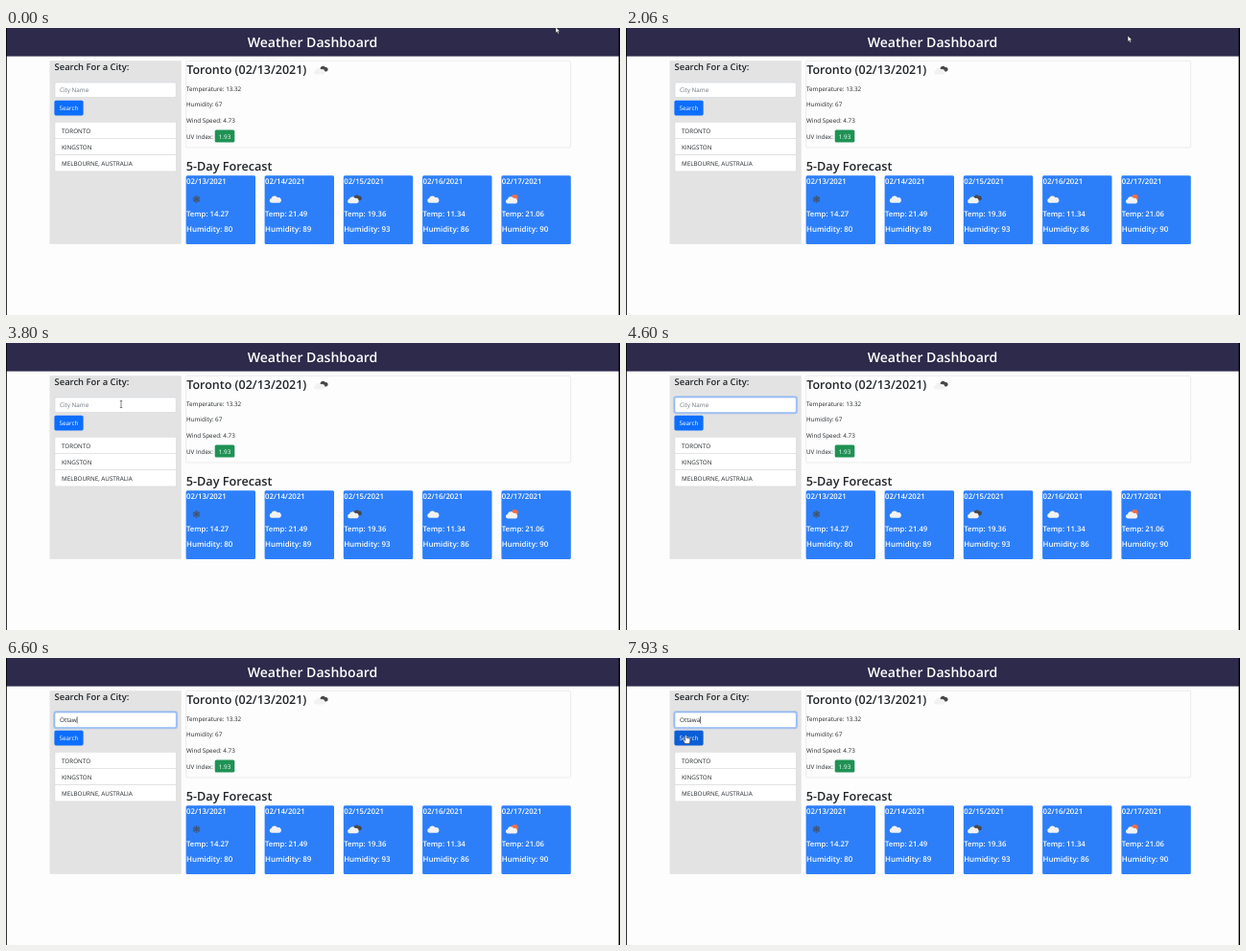
These frames come from a looping animation (640x300 px, 8 s). An HTML page:

```html
<!DOCTYPE html>
<html lang="en">
<head>
<meta charset="utf-8">
<title>Weather Dashboard</title>
<style>
  html, body { margin: 0; width: 100%; height: 100%; overflow: hidden; background: #fdfdfd; }
  svg { display: block; width: 640px; height: 300px; }
  text { font: 6.3px "Open Sans", "Noto Sans", sans-serif; fill: #212529; text-rendering: geometricPrecision; white-space: pre; }
  .head { font-weight: 600; }
  .light { fill: #fff; }
</style>
</head>
<body>
<svg id="stage" viewBox="0 0 640 300"></svg>
<script>
const LOOP = 8000, STEP = 1000 / 15;
const stage = document.getElementById('stage');

const rect = (x, y, w, h, fill, more = '') =>
  `<rect x="${x}" y="${y}" width="${w}" height="${h}" fill="${fill}" ${more}/>`;
const text = (x, y, s, more = '') => `<text x="${x}" y="${y}" ${more}>${s}</text>`;
const head = (x, y, size, s, cls = '', more = '') =>
  text(x, y, s, `class="head ${cls}" style="font-size:${size}px" ${more}`);

const cloud = (x, y, fill, k = 1) =>
  `<path transform="translate(${x} ${y}) scale(${k})" fill="${fill}"
    d="M2.5 7.6A2.4 2.4 0 0 1 2.4 2.9A3.5 3.5 0 0 1 8.8 2A2.9 2.9 0 0 1 10.6 7.6Z"/>`;
const overcast = (x, y) =>
  cloud(x + 5.4, y, '#48484a', .78) + cloud(x, y + 1.9, '#f2f2f2', .95);

const icons = {
  snow: x => {
    const arm = a => `<path transform="rotate(${a})" d="M0 0V-4M-1.3-3.6L0-2.3L1.3-3.6M-1-1.9L0-1L1-1.9"/>`;
    return `<g transform="translate(${x + 10.5} 179)" fill="none" stroke="#48484a" stroke-width=".65" opacity=".85">
      ${[0, 60, 120, 180, 240, 300].map(arm).join('')}</g>`;
  },
  cloud: x => cloud(x + 4.2, 175.2, '#f2f2f2'),
  overcast: x => overcast(x + 3.4, 174.2),
  sunny: x => `<circle cx="${x + 13.6}" cy="177.4" r="3.3" fill="#ec6e4c"/>` +
    cloud(x + 3.6, 176, '#f2f2f2')
};

const days = [
  [188, 13, 'snow', 14.27, 80],
  [270, 14, 'cloud', 21.49, 89],
  [352.2, 15, 'overcast', 19.36, 93],
  [434.5, 16, 'cloud', 11.34, 86],
  [516.8, 17, 'sunny', 21.06, 90]
];
const dayCard = ([x, day, icon, temp, humidity]) =>
  rect(x - .4, 154.2, 72.4, 71.7, '#2d7ff9', 'rx="1.5"') +
  head(x, 162.9, 7.8, `02/${day}/2021`, 'light') + icons[icon](x) +
  head(x, 197, 7.7, `Temp: ${temp}`, 'light') +
  head(x, 213.3, 7.9, `Humidity: ${humidity}`, 'light');

const listRow = (name, i) =>
  rect(51, 98.3 + i * 17.2, 126.3, 17.2, '#fff', 'stroke="#d8d8d8" stroke-width=".5"') +
  text(58, 109.7 + i * 17.1, name);

stage.innerHTML =
  rect(0, 0, 640, 300, '#fdfdfd') +
  rect(0, 0, 640, 29.6, '#2d2a4b') +
  head(319.5, 19.6, 14.05, 'Weather Dashboard', 'light', 'text-anchor="middle"') +
  rect(45.5, 34.2, 137.2, 191.6, '#e3e3e3') +
  head(50.6, 44, 9.4, 'Search For a City:') +
  rect(51, 57, 126.3, 15.6, '#fff', 'id="field" rx="1.6" stroke-width=".6"') +
  rect(50.1, 56.1, 128.1, 17.4, 'none', 'id="ring" rx="2.2" stroke="#0d6efd" stroke-opacity=".28" stroke-width="1.7"') +
  text(56, 67.1, '', 'id="entry"') +
  rect(0, 61.2, .6, 7.2, '#111', 'id="caret"') +
  rect(50.4, 75.8, 30.2, 15.6, '', 'id="button" rx="1.6"') +
  text(65.5, 86, 'Search', 'class="light" text-anchor="middle"') +
  ['TORONTO', 'KINGSTON', 'MELBOURNE, AUSTRALIA'].map(listRow).join('') +
  rect(187.7, 34.3, 400.9, 90.7, '#fdfdfd', 'rx="1.5" stroke="#dfdfdf" stroke-width=".6"') +
  head(188.2, 48, 12.5, 'Toronto (02/13/2021)') +
  overcast(320.4, 39.5) +
  ['Temperature: 13.32', 'Humidity: 67', 'Wind Speed: 4.73', 'UV Index:']
    .map((s, i) => text(188, 65.8 + i * 16.6, s)).join('') +
  rect(217.7, 106.5, 20.6, 13, '#1f9254', 'rx="1.6"') +
  text(228, 115.5, '1.93', 'class="light" text-anchor="middle"') +
  head(187.8, 148.8, 12.65, '5-Day Forecast') +
  days.map(dayCard).join('') +
  rect(0, 0, .8, 300, '#000') + rect(638.6, 0, 1.4, 300, '#000') +
  `<path id="arrow" d="M0 0V6L1.4 4.8L2.4 7L3.4 6.5L2.5 4.4H4.3Z" fill="#fff" stroke="#222" stroke-width=".4"/>
   <path id="beam" d="M-1.2-3.5H1.2M0-3.5V3.5M-1.2 3.5H1.2" fill="none" stroke="#333" stroke-width=".6"/>
   <path id="hand" fill="#fff" stroke="#222" stroke-width=".5" stroke-linejoin="round"
     d="M-.8.5Q0-.7.8.5V3L2 3.2L3.2 3.6L4.3 4.2V6.5L3.5 9H-1L-2.9 5.8Q-2.9 4.5-1.7 5.2L-.8 6Z"/>`;

const part = Object.fromEntries(
  ['field', 'ring', 'entry', 'caret', 'button', 'arrow', 'beam', 'hand']
    .map(id => [id, document.getElementById(id)]));
const show = (el, on) => el.setAttribute('visibility', on ? 'visible' : 'hidden');

// Pointer strokes: start, end, shape, from, to
const strokes = [
  [0, 60, 'arrow', 573, -1, 573, -1],
  [2060, 2260, 'arrow', 524, 9, 506, -8],
  [3460, 3800, 'arrow', 440, 8, 150, 50],
  [3800, 3860, 'beam', 120, 64, 120, 64],
  [7130, 7600, 'beam', 96, 65, 84, 68],
  [7600, 7730, 'arrow', 79, 73, 72, 76],
  [7730, 8000, 'hand', 68, 81, 62.5, 80.5]
];
const keyTimes = [5930, 6130, 6200, 6330, 6600, 6730];

function draw(t) {
  const tick = Math.floor((t + 7) / STEP) * STEP;
  const focused = t >= 4600;
  const typed = 'Ottawa'.slice(0, keyTimes.filter(k => t >= k).length);

  part.field.setAttribute('stroke', focused ? '#86b7fe' : '#ced4da');
  show(part.ring, focused);
  part.entry.textContent = typed || 'City Name';
  part.entry.style.fill = typed ? '#212529' : '#6c757d';
  const end = typed ? part.entry.getComputedTextLength() : 0;
  part.caret.setAttribute('x', 56 + end);
  show(part.caret, t >= 5200 && t < 5660 || t >= 5930 && t < 7260 || t >= 7790);
  part.button.setAttribute('fill', t >= 7730 ? '#0b5ed7' : '#0d6efd');

  const stroke = strokes.find(([a, b]) => t >= a && t < b);
  for (const id of ['arrow', 'beam', 'hand']) show(part[id], stroke && stroke[2] === id);
  if (stroke) {
    const [a, b, id, x0, y0, x1, y1] = stroke;
    const span = Math.max(STEP, b - a - STEP);
    const p = Math.min(1, Math.max(0, (tick - a) / span));
    part[id].setAttribute('transform', `translate(${x0 + (x1 - x0) * p} ${y0 + (y1 - y0) * p})`);
  }
}

const start = performance.now();
function frame() {
  draw((performance.now() - start) % LOOP);
  requestAnimationFrame(frame);
}
frame();
</script>
</body>
</html>
```
